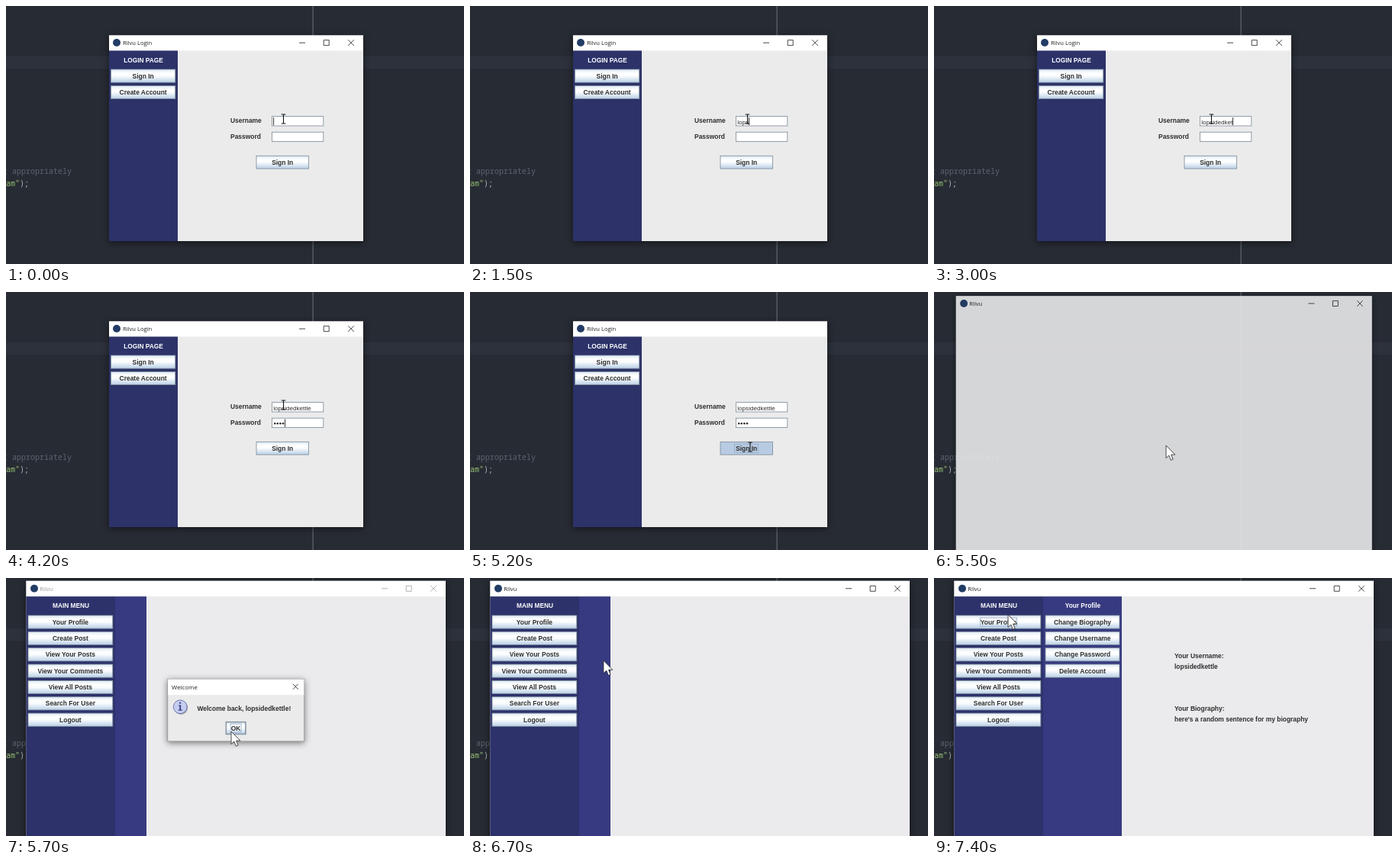
Animation, 600 px wide and 338 px high, one loop 8000 ms. Source, as an HTML page:

```html
<!DOCTYPE html>
<html lang="en">
<head>
<meta charset="utf-8">
<title>Login demo</title>
<style>
  html, body { margin: 0; width: 100%; height: 100%; overflow: hidden; background: #272b33; }
  svg { display: block; width: 100vw; height: 100vh; }
  text { white-space: pre; }
  .code { font: 10px "Noto Sans Mono", "DejaVu Sans Mono", monospace; }
  .title { font: 7.6px "Open Sans", "Noto Sans", sans-serif; fill: #222; }
  .bold { font: bold 8.45px "Liberation Sans", Arial, sans-serif; fill: #2e2e2e; }
  .head { font-size: 8.3px; fill: #fff; }
  .plain { font: 8.1px "Liberation Sans", Arial, sans-serif; fill: #2e2e2e; }
  .mid { text-anchor: middle; }
  .btn rect { fill: url(#metal); stroke: #7a8a99; stroke-width: .8; }
  .btn .focus { fill: none; stroke: none; }
  .btn.focused .focus { stroke: #93a9c6; stroke-width: .8; }
  .btn.pressed .face { fill: #b8cbe2; }
  .field { fill: #fff; stroke: #7a8a99; stroke-width: .8; }
  .caret { fill: #222; }
  .ctl { fill: none; stroke: #333; stroke-width: .9; }
  .inactive .title { fill: #999; }
  .inactive .ctl { stroke: #aaa; }
  .win { filter: drop-shadow(0 2px 4px rgba(0, 0, 0, .5)); }
</style>
</head>
<body>
<svg id="stage" viewBox="0 0 600 338"></svg>
<script>
const APP = 'Rilvu';
const USER = 'lopsidedkettle';
const LOOP = 8000, STEP = 100;

const rect = (x, y, w, h, fill) => `<rect x="${x}" y="${y}" width="${w}" height="${h}" fill="${fill}"/>`;
const text = (x, y, cls, s) => `<text x="${x}" y="${y}" class="${cls}">${s}</text>`;
const field = y => `<rect class="field" x="348.4" y="${y}" width="67.4" height="12.4"/>`;

function button(x, y, w, h, label, id = '', focusW = 0) {
  const cx = x + w / 2, cy = y + h / 2;
  return `<g class="btn" id="${id}">
    <rect class="face" x="${x}" y="${y}" width="${w}" height="${h}"/>
    <rect class="focus" x="${cx - focusW / 2}" y="${cy - 5.5}" width="${focusW}" height="11"/>
    ${text(cx, cy + 3, 'bold mid', label)}</g>`;
}

const cross = (x, y, r) => `M${x - r} ${y - r}l${2 * r} ${2 * r}m0 ${-2 * r}l${-2 * r} ${2 * r}`;

// Minimise, maximise and close signs, centred on three x positions
const controls = (a, b, c, y) =>
  `<path class="ctl" d="M${a - 4} ${y}h8M${b - 3.5} ${y - 3.5}h7v7h-7zM${cross(c, y, 3.8).slice(1)}"/>`;

const menu = ['Your Profile', 'Create Post', 'View Your Posts', 'View Your Comments',
  'View All Posts', 'Search For User', 'Logout'];
const profileMenu = ['Change Biography', 'Change Username', 'Change Password', 'Delete Account'];
const column = (x, w, labels, prefix) =>
  labels.map((s, i) => button(x, 49 + 21.35 * i, w, 17.2, s, prefix + i, 48)).join('');

const desktop = `
  ${rect(0, 0, 600, 338, '#272b33')}
  ${rect(0, 66, 600, 16, '#2c313b')}
  ${rect(401.6, 0, 1, 338, '#70747b')}
  <text class="code" x="-4" y="219.5" fill="#5c6370" font-style="italic">t appropriately</text>
  <text class="code" x="0" y="235.7" fill="#abb2bf"><tspan fill="#98c379">am"</tspan>);</text>`;

const login = `
  <g id="login" class="win">
    ${rect(135, 38.5, 333, 269.5, '#ebebeb')}
    ${rect(135, 38.5, 333, 20, '#fff')}
    ${rect(135, 58.5, 90, 249.5, '#2d3269')}
    <circle cx="145" cy="48" r="5" fill="#223c66"/>
    ${text(153, 51.3, 'title', APP + ' Login')}
    <g id="loginCtl">${controls(388, 419.7, 452, 48.2)}</g>
    ${text(180, 73.9, 'bold head mid', 'LOGIN PAGE')}
    ${button(137.4, 83, 84.4, 17.2, 'Sign In')}
    ${button(137.4, 104.4, 84.4, 17.2, 'Create Account')}
    ${text(294, 153.2, 'bold', 'Username')}
    ${text(294, 174, 'bold', 'Password')}
    ${field(144.6)}${field(165.2)}
    <text id="name" class="plain" x="350.3" y="154.9"></text>
    <g id="dots">${[0, 1, 2, 3].map(i => `<circle cx="${352.2 + 3.6 * i}" cy="172.3" r="1.2" fill="#222"/>`).join('')}</g>
    <rect id="nameCaret" class="caret" y="146" width=".9" height="10.2"/>
    <rect id="passCaret" class="caret" y="166.6" width=".9" height="10.2"/>
    ${button(328, 196.3, 68.4, 16.8, 'Sign In', 'signIn', 31)}
  </g>`;

const dialog = `
  <g id="dialog" class="win">
    ${rect(211.5, 132, 179.5, 82.2, '#8d8d8d')}
    ${rect(212.2, 132.7, 178.1, 80.8, '#ebebeb')}
    ${rect(212.2, 132.7, 178.1, 20.5, '#fff')}
    <text class="title" style="fill:#222;font-size:7.9px" x="217" y="145.7">Welcome</text>
    <path class="ctl" style="stroke:#333" d="${cross(379.3, 142.3, 3.5)}"/>
    <circle cx="229.3" cy="170" r="9" fill="#a6a6b2"/>
    <circle cx="228.2" cy="168.8" r="8.9" fill="#c5cdf0" stroke="#6670a4" stroke-width=".9"/>
    <path d="M226 166.6h3.2v6h1.6v1.2h-5v-1.2h1.5v-4.8h-1.3zM227.2 162.8h2v2h-2z" fill="#3a4280"/>
    ${text(250.5, 174, 'bold', `Welcome back, ${USER}!`)}
    ${button(288, 188.3, 26.2, 16.6, 'OK', 'ok', 14)}
    <rect x="288.8" y="189.1" width="24.6" height="15" fill="none" stroke="#7a8a99" stroke-width=".8"/>
  </g>`;

const main = `
  <g id="main" class="win">
    ${rect(26.5, 3.8, 549.5, 338.4, '#ebebed')}
    <g id="page">
      ${rect(26.5, 3.8, 549.5, 20.4, '#fff')}
      ${rect(26.5, 24.2, 116.5, 318, '#2d326b')}
      <rect id="side" x="143" y="24.2" height="318" fill="#373a80"/>
      ${text(85, 39.3, 'bold head mid', 'MAIN MENU')}
      ${column(29, 110.8, menu, 'menu')}
      <g id="profile">
        ${text(195, 39.3, 'bold head mid', 'Your Profile')}
        ${column(146, 97, profileMenu, 'sub')}
        ${text(315, 105, 'bold', 'Your Username:')}
        ${text(315, 119, 'bold', USER)}
        ${text(315, 174, 'bold', 'Your Biography:')}
        ${text(315, 188, 'bold', "here's a random sentence for my biography")}
      </g>
    </g>
    <circle cx="37" cy="13.7" r="5" fill="#223c66"/>
    ${text(44.3, 17, 'title', APP)}
    ${controls(496, 527.7, 560, 13.8)}
  </g>`;

const cursors = `
  <path id="beam" d="M-2.8 -6h2q.8 0 .8 .8q0 -.8 .8 -.8h2M0 -5.2V5.2M-2.8 6h2q.8 0 .8 -.8q0 .8 .8 .8h2"
    fill="none" stroke="#111" stroke-width="1.1"/>
  <path id="arrow" d="M0 0V16.6L3.8 13.1L6.4 19.3L9.2 18.1L6.6 12.1H11.9Z"
    fill="#fff" stroke="#222" stroke-width=".8"/>`;

document.getElementById('stage').innerHTML = `
  <defs><linearGradient id="metal" x2="0" y2="1">
    <stop stop-color="#dde8f3"/><stop offset=".3" stop-color="#fff"/>
    <stop offset=".5" stop-color="#fafcfe"/><stop offset="1" stop-color="#b8cfe5"/>
  </linearGradient></defs>` + desktop + main + login + dialog + cursors;

const $ = id => document.getElementById(id);
const show = (id, on) => $(id).setAttribute('opacity', +on);
const mark = (id, cls, on) => $(id).classList.toggle(cls, on);

function pose(id, cx, cy, scale, opacity) {
  $(id).setAttribute('transform', `translate(${cx} ${cy}) scale(${scale}) translate(${-cx} ${-cy})`);
  show(id, opacity);
}

const keys = [500, 600, 900, 1500, 1700, 1900, 2100, 2600, 2700, 2800, 3000, 3400, 3500, 3600];
const passKeys = [4000, 4100, 4200, 4200];
const typed = (list, t) => list.filter(k => k <= t).length;

// Pointer stops: time, x, y
const path = [[0, 363.5, 148], [4500, 363.5, 148], [5000, 367, 203], [5200, 367, 203],
  [5300, 343, 200], [5400, 320, 199], [5500, 304, 201], [5700, 295, 201],
  [6300, 295, 201], [7000, 97, 48], [LOOP, 97, 48]];

function pointer(t) {
  const i = path.findIndex(p => p[0] > t);
  const [a, ax, ay] = path[i - 1], [b, bx, by] = path[i];
  const u = (t - a) / (b - a), e = u * u * (3 - 2 * u);
  return [ax + (bx - ax) * e, ay + (by - ay) * e];
}

function draw(t) {
  // Login form
  const name = $('name'), dots = typed(passKeys, t);
  name.textContent = USER.slice(0, typed(keys, t));
  $('nameCaret').setAttribute('x', 350.2 + name.getComputedTextLength());
  $('passCaret').setAttribute('x', 350.2 + (dots ? 3.6 * dots + .4 : 0));
  show('nameCaret', t < 200 || (t >= 500 && t < 3700));
  show('passCaret', t >= 3700 && t < 5100);
  [...$('dots').children].forEach((d, i) => d.setAttribute('opacity', +(i < dots)));
  mark('signIn', 'pressed', t >= 5100);
  mark('signIn', 'focused', t >= 5100);
  show('loginCtl', t < 5200);
  if (t < 5300) pose('login', 301.5, 173, 1, 1);
  else if (t < 5400) pose('login', 301.5, 173, .985, .6);
  else pose('login', 301, 172.7, .958, t < 5500 ? .12 : 0);

  // Main window
  if (t < 5500) pose('main', 301, 173, .965, t < 5400 ? 0 : .31);
  else if (t < 5600) pose('main', 301, 173, .992, .89);
  else pose('main', 301, 173, 1, 1);
  const profile = t >= 7300;
  show('page', t >= 5600);
  show('profile', profile);
  $('side').setAttribute('width', profile ? 103 : 41);
  mark('main', 'inactive', t >= 5700 && t < 6300);
  mark('menu0', 'pressed', t >= 7100 && t < 7300);
  mark('menu0', 'focused', t >= 7100);

  // Welcome dialog
  if (t >= 6300) pose('dialog', 301, 173, .96, t < 6400 ? .4 : 0);
  else pose('dialog', 301, 173, 1, t >= 5700);
  mark('ok', 'focused', true);
  mark('ok', 'pressed', t >= 6200);

  const at = `translate(${pointer(t).join(' ')})`;
  for (const id of ['beam', 'arrow']) $(id).setAttribute('transform', at);
  show('beam', t < 5300);
  show('arrow', t >= 5300);
}

let start;
function tick(now) {
  start ??= now;
  const t = (now - start) % LOOP;
  draw(Math.floor(t / STEP) * STEP);
  requestAnimationFrame(tick);
}
draw(0);
requestAnimationFrame(tick);
</script>
</body>
</html>
```
